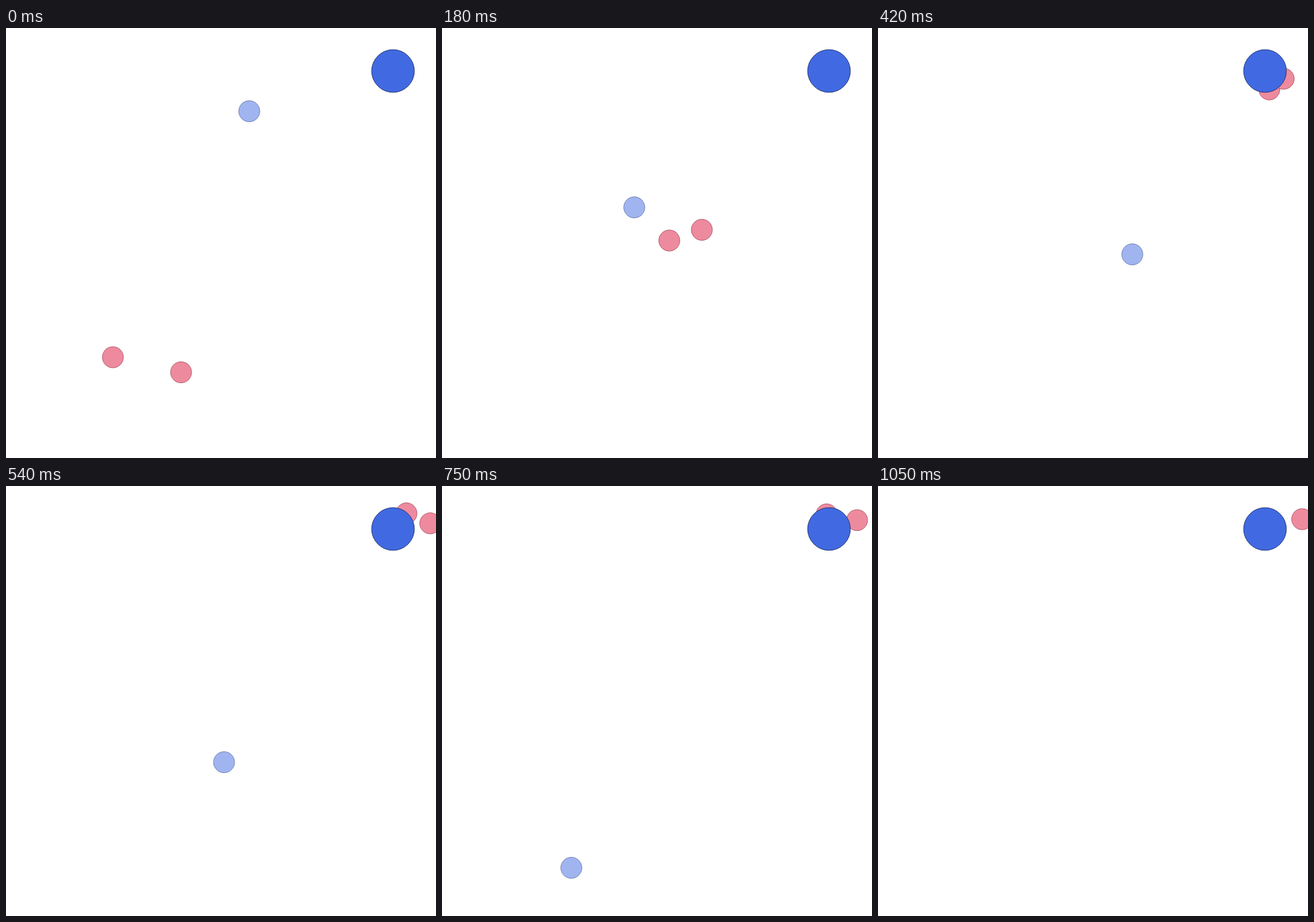
Write an HTML page with a canvas that moves like this. It is 700 px wide and 700 px high and loops after 1080 ms.

```html
<!DOCTYPE html>
<html>
<head>
<meta charset="utf-8">
<style>
html, body { margin: 0; width: 100%; height: 100%; overflow: hidden; background: #fff; }
canvas { display: block; }
</style>
</head>
<body>
<canvas id="stage" width="700" height="700"></canvas>
<script>
const ctx = document.getElementById('stage').getContext('2d');
const STEP = 30, STEPS = 36;
const CRIMSON = [220, 20, 60], ROYAL = [65, 105, 225];

// Key points: [step, x, y]
const chaserA = [[0, 174, 536], [6, 370, 346], [10, 505.4, 224.6], [14, 637, 100],
  [16, 664, 52], [22, 621, 46], [29, 640.5, 49], [35, 635, 60]];
const chaserB = [[0, 285, 560.5], [6, 423, 328.5], [10, 519, 174], [12, 576, 107],
  [14, 660.4, 82.6], [16, 692, 66], [22, 677.5, 56], [29, 677.5, 56.5], [35, 690.5, 54]];
const runner = [[0, 396, 135.5], [6, 313, 292], [10, 417, 293], [14, 414, 368.5],
  [22, 277, 541], [35, -30, 910]];

// Smooth curve through unevenly timed key points
function at(path, s) {
  const i = path.findIndex(p => p[0] > s) - 1;
  const j = i < 0 ? path.length - 2 : i;
  const p = path[j], q = path[j + 1];
  const before = path[j - 1] || p, after = path[j + 2] || q;
  const span = q[0] - p[0], u = (s - p[0]) / span, v = 1 - u;
  const slope = (a, b, k) => (b[k] - a[k]) / (b[0] - a[0]);
  return [1, 2].map(k =>
    v * v * (1 + 2 * u) * p[k] + u * u * (3 - 2 * u) * q[k] +
    span * u * v * (v * slope(before, q, k) - u * slope(p, after, k)));
}

// Fill tinted towards white, edge in the half-bright colour
function disc([x, y], r, color, alpha) {
  const tint = color.map(c => 255 + (c - 255) * alpha);
  ctx.beginPath();
  ctx.arc(x, y, r, 0, Math.PI * 2);
  ctx.fillStyle = `rgb(${tint})`;
  ctx.fill();
  ctx.strokeStyle = `rgba(${color.map(c => c / 2)}, ${alpha})`;
  ctx.stroke();
}

const start = performance.now();
function draw() {
  const s = Math.floor((performance.now() - start) / STEP) % STEPS;
  ctx.clearRect(0, 0, 700, 700);
  disc(at(chaserA, s), 17.2, CRIMSON, 0.5);
  disc(at(chaserB, s), 17.2, CRIMSON, 0.5);
  disc(at(runner, s), 17.2, ROYAL, 0.5);
  disc([630, 70], 34.8, ROYAL, 1);
  requestAnimationFrame(draw);
}
draw();
</script>
</body>
</html>
```
